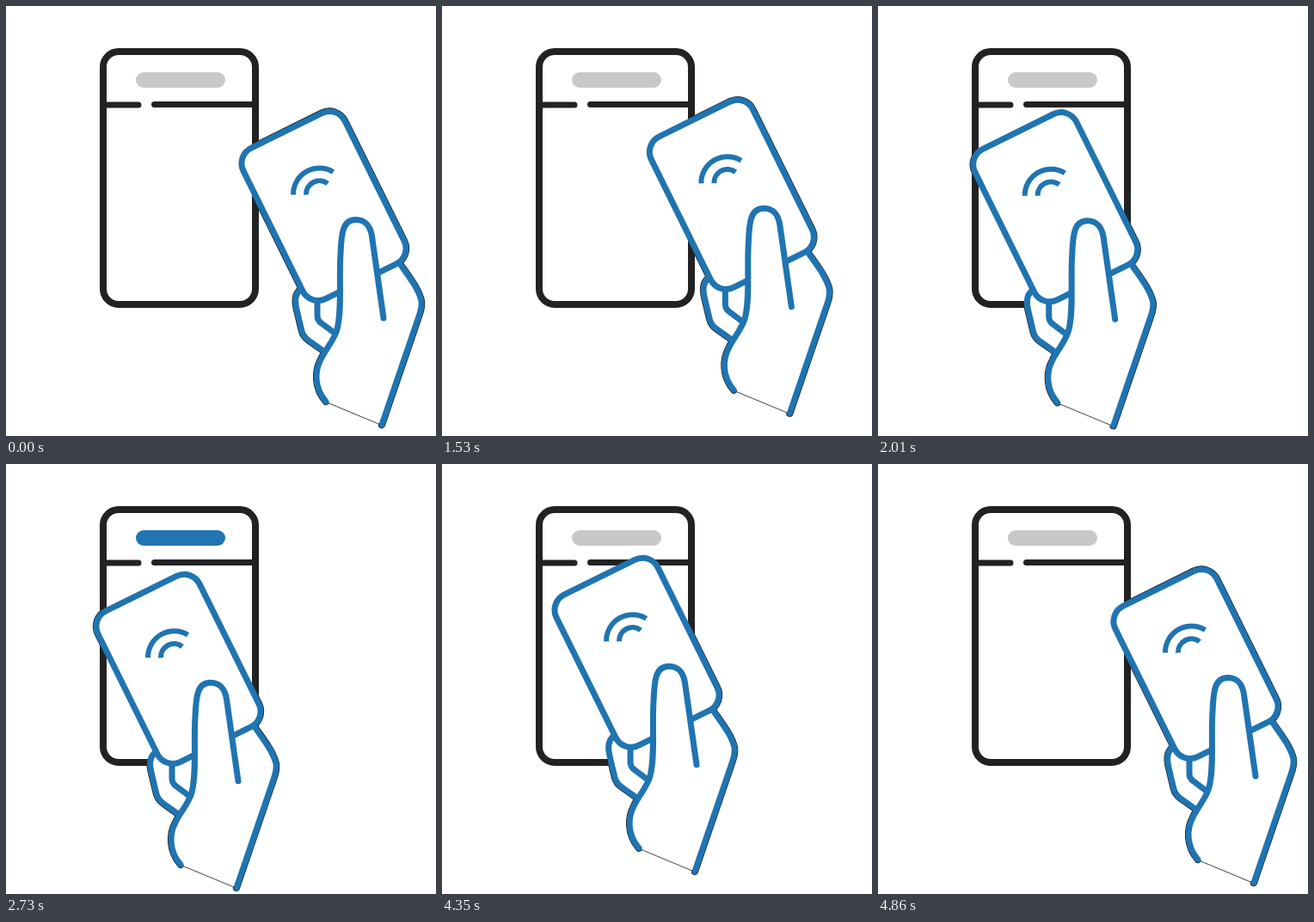
These frames come from a looping animation (500 px wide and 500 px high, 8130 ms). An HTML page:

```html
<!DOCTYPE html>
<html lang="en">
<head>
<meta charset="utf-8">
<title>Card tap</title>
<style>
  html, body { margin: 0; width: 100%; height: 100%; overflow: hidden; background: #fff; }
  svg { display: block; width: 100%; height: 100%; }
  .line { fill: none; stroke-width: 7; stroke-linecap: round; stroke-linejoin: round; }
  .dark { stroke: #222; }
  .blue { stroke: #1f74b1; }
  .fringe { stroke: #111; stroke-width: 8.2; }
  .white { fill: #fff; }
</style>
</head>
<body>
<svg viewBox="0 0 500 500">
  <defs>
    <path id="track" d="M0 0 C-30 -13 -78 -32.5 -108 -28 C-128 -25 -151 -9 -169 5.8"/>
    <clipPath id="outside">
      <path clip-rule="evenodd" d="M0 0H500V500H0Z M131 49H272a22 22 0 0 1 22 22V329a22 22 0 0 1 -22 22H131a22 22 0 0 1 -22 -22V71a22 22 0 0 1 22 -22Z"/>
    </clipPath>
    <rect id="card" x="-65.8" y="-97.8" width="131.6" height="195.6" rx="20"
      transform="translate(369.5 232.5) rotate(-26.3)"/>
    <path id="finger" d="M341 331 C335 337 336 345 338 353 L344 378 C345 382 348 386 352 389 L369 401"/>
    <path id="wrist" d="M459 301 C468 314 480 329 483 343 C484 350 482 355 480 361 L437 487"/>
    <path id="thumb" d="M372 460 C358 444 359 424 366 411 C371 400 382 388 385 376 C391 352 387 318 389 288 C390 262 392 248.5 407 248.5 C418 248.5 424 257 425.5 268 L439 363"/>
  </defs>

  <rect class="line dark white" x="113" y="53" width="177" height="294" rx="18" style="fill:#fff;stroke-width:8"/>
  <path class="line dark" d="M116 115H154 M172.5 114.5H288"/>
  <rect id="lamp" x="151" y="77" width="104" height="18" rx="9"/>

  <g clip-path="url(#outside)">
    <g class="hand line fringe">
      <use href="#card"/>
      <use href="#finger"/>
      <use href="#wrist"/>
      <use href="#thumb"/>
    </g>
  </g>

  <g class="hand">
    <path class="white" d="M341 331 C335 337 336 345 338 353 L344 378 C345 382 348 386 352 389 L369 401 L385 376 L388 320Z"/>
    <path class="white" d="M372 460 C358 444 359 424 366 411 C371 400 382 388 385 376 L400 310 L459 301 C468 314 480 329 483 343 C484 350 482 355 480 361 L437 487Z"/>
    <path d="M372 460.5L437 487.5" stroke="#111" stroke-width=".8"/>
    <g class="line blue">
      <use href="#finger"/>
      <path d="M362 345V360C362 365 364 367 367 369L383 381"/>
      <use href="#wrist"/>
      <use href="#card" fill="#fff"/>
    </g>
    <path class="line blue" style="stroke-width:6;stroke-linecap:butt" d="M334 219.5A30.5 30.5 0 0 1 380.5 193 M349 219.5A15.5 15.5 0 0 1 374 206.5"/>
    <use href="#thumb" class="white"/>
    <use href="#thumb" class="line blue"/>
  </g>
</svg>
<script>
  const LOOP = 8130, STEP = 30;
  const track = document.getElementById('track');
  const lamp = document.getElementById('lamp');
  const hands = document.querySelectorAll('.hand');
  const reach = track.getTotalLength();
  const grey = [200, 200, 200], blue = [34, 116, 178];

  const span = (t, from, to) => Math.min(1, Math.max(0, (t - from) / (to - from)));

  // cubic-bezier(.48, 0, .6, 1)
  function ease(x) {
    let lo = 0, hi = 1;
    for (let i = 0; i < 30; i++) {
      const u = (lo + hi) / 2, v = 1 - u;
      if (3 * v * v * u * 0.48 + 3 * v * u * u * 0.6 + u * u * u < x) lo = u;
      else hi = u;
    }
    return lo * lo * (3 - 2 * lo);
  }

  function draw(t) {
    const go = ease(span(t, 1230, 2130)) - ease(span(t, 4110, 4860));
    const p = track.getPointAtLength(go * reach);
    hands.forEach(h => h.setAttribute('transform', `translate(${p.x.toFixed(2)} ${p.y.toFixed(2)})`));

    // the lamp pulses twice
    const glow = (1 - Math.cos(span(t, 2370, 3810) * 4 * Math.PI)) / 2;
    const rgb = grey.map((c, i) => Math.round(c + (blue[i] - c) * glow));
    lamp.setAttribute('fill', `rgb(${rgb})`);
  }

  const start = performance.now();
  function tick() {
    const t = (performance.now() - start) % LOOP;
    draw(Math.floor(t / STEP) * STEP);
    requestAnimationFrame(tick);
  }
  draw(0);
  requestAnimationFrame(tick);
</script>
</body>
</html>
```
